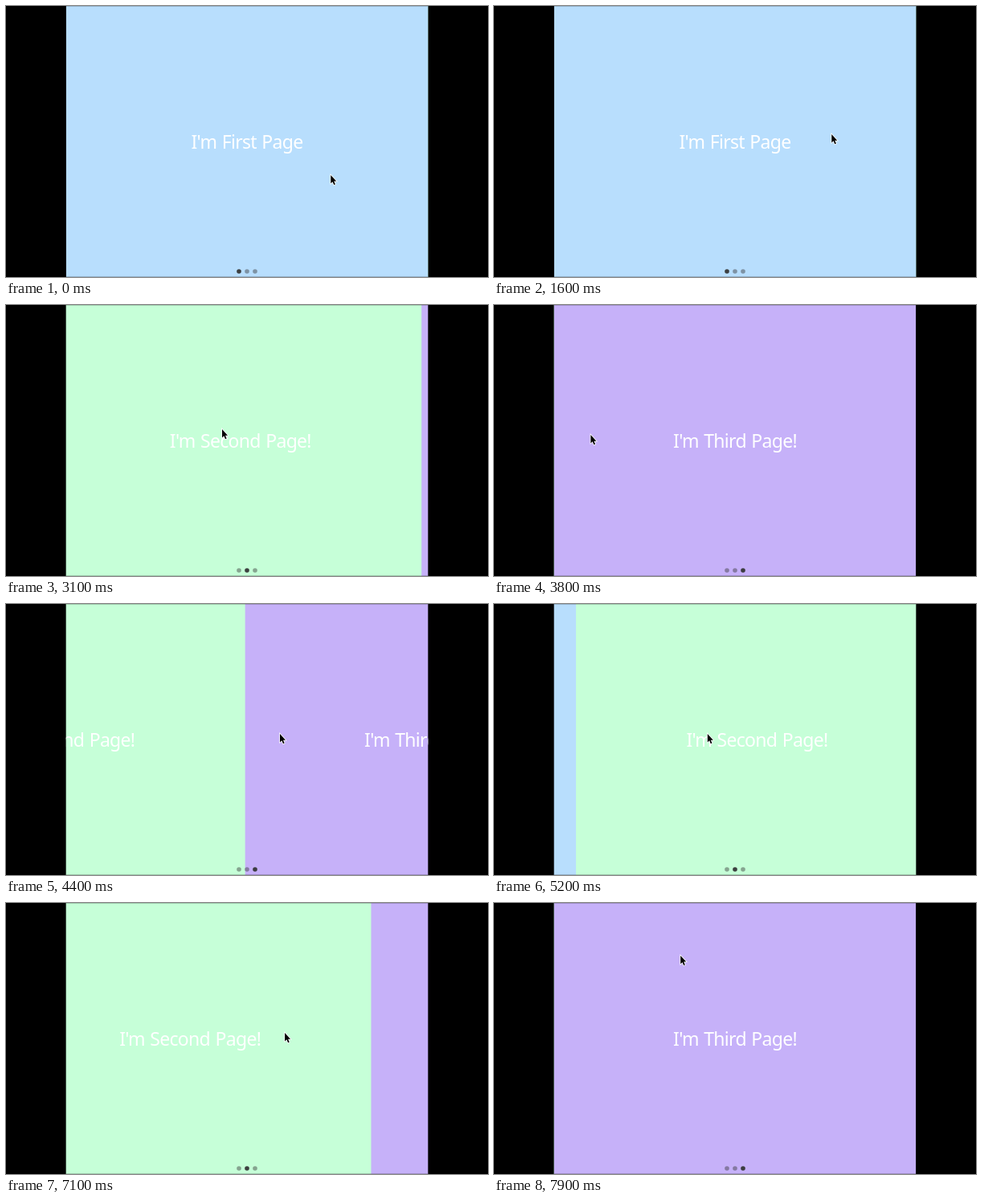
An HTML page that plays this animation: 600x338 px, repeating every 8 s.

```html
<!DOCTYPE html>
<html lang="en">
<head>
<meta charset="utf-8">
<title>Swipe pages</title>
<style>
  html, body { margin: 0; width: 100%; height: 100%; overflow: hidden; background: #000; }
  svg { display: block; width: 600px; height: 338px; }
  svg svg { width: auto; height: auto; }
  text {
    font: 23px "Noto Sans", sans-serif; letter-spacing: -.7px; word-spacing: 1.2px;
    fill: #fff; text-anchor: middle;
  }
  #dots circle { fill: #353637; opacity: .45; }
  #dots circle.on { opacity: .95; }
</style>
</head>
<body>
<svg viewBox="0 0 600 338">
  <rect width="600" height="338"/>
  <g transform="translate(74.67 0)">
    <clipPath id="screen"><rect width="450.67" height="338"/></clipPath>
    <g clip-path="url(#screen)">
      <g id="pages"></g>
      <path d="M0 .5H451M0 337.5H451" stroke="#000" stroke-opacity=".2"/>
    </g>
  </g>
  <g id="dots"></g>
  <path id="cursor" d="M0 0V10.4L2.3 8.3L4 12.2L5.6 11.5L4 7.7H7Z"
        stroke="#fff" stroke-width="1.5" paint-order="stroke"/>
</svg>
<script>
const LOOP = 8000, STEP = 100, WIDTH = 450.67, DOT_DELAY = 300;

const pages = [
  ["I'm First Page", "#b8defd"],
  ["I'm Second Page!", "#c6ffd8"],
  ["I'm Third Page!", "#c6b1f9"]
];

// A move is an S-curve: [middle in ms, softness in ms, distance in px].
// In a swipe the page follows the pointer, then glides on to the next page.
const swipe = (drag, middle, softness) =>
  ({ drag, glide: [middle, softness, Math.sign(drag[2]) * WIDTH - drag[2]] });

const swipes = [
  swipe([2150, 35, -170], 2600, 40),
  swipe([3190, 30, -156], 3250, 25),
  swipe([4250, 45, 200], 4450, 25),
  swipe([5233, 25, 130], 5900, 30),
  swipe([6290, 30, -304], 6410, 35),
  swipe([7130, 30, -250], 7240, 35)
];
const drags = swipes.map(s => s.drag);
const pageMoves = swipes.flatMap(s => [s.drag, s.glide]);

const pointerX = [
  ...drags,
  [300, 40, -222], [750, 60, 230], [1550, 12, 8], [2850, 25, 26],
  [4400, 20, 55], [4800, 25, -224], [4950, 12, 87],
  [5900, 30, 100], [6850, 30, 250], [7600, 20, 189], [7800, 20, -122]
];
const pointerY = [[250, 40, -51], [2300, 60, -5], [3300, 30, 7], [7700, 40, -97]];

const travel = (moves, t) => moves.reduce(
  (sum, [middle, softness, distance]) =>
    sum + distance / (1 + Math.exp((middle - t) / softness)), 0);

const $ = id => document.getElementById(id);
const moveTo = (id, x, y) => $(id).setAttribute("transform", `translate(${x} ${y})`);

function add(parent, tag, attrs, label = "") {
  const el = document.createElementNS("http://www.w3.org/2000/svg", tag);
  for (const name in attrs) el.setAttribute(name, attrs[name]);
  el.textContent = label;
  return parent.appendChild(el);
}

pages.forEach(([label, fill], i) => {
  add($("pages"), "rect", { x: i * WIDTH, width: WIDTH + (i < 2 ? 1 : 0), height: 338, fill });
});
pages.forEach(([label], i) => {
  add($("pages"), "text", { x: (i + .5) * WIDTH, y: 178 }, label);
});
const dots = pages.map((_, i) => add($("dots"), "circle", { cx: 290 + i * 10, cy: 331, r: 2.8 }));

function draw(now) {
  const t = Math.floor(now % LOOP / STEP) * STEP;
  const page = Math.round(-travel(pageMoves, t - DOT_DELAY) / WIDTH);
  moveTo("pages", travel(pageMoves, t), 0);
  moveTo("cursor", 404.4 + travel(pointerX, t), 211 + travel(pointerY, t));
  dots.forEach((dot, i) => dot.classList.toggle("on", i === Math.abs(page)));
}

const start = performance.now();
function tick() {
  draw(performance.now() - start);
  requestAnimationFrame(tick);
}
tick();
</script>
</body>
</html>
```
